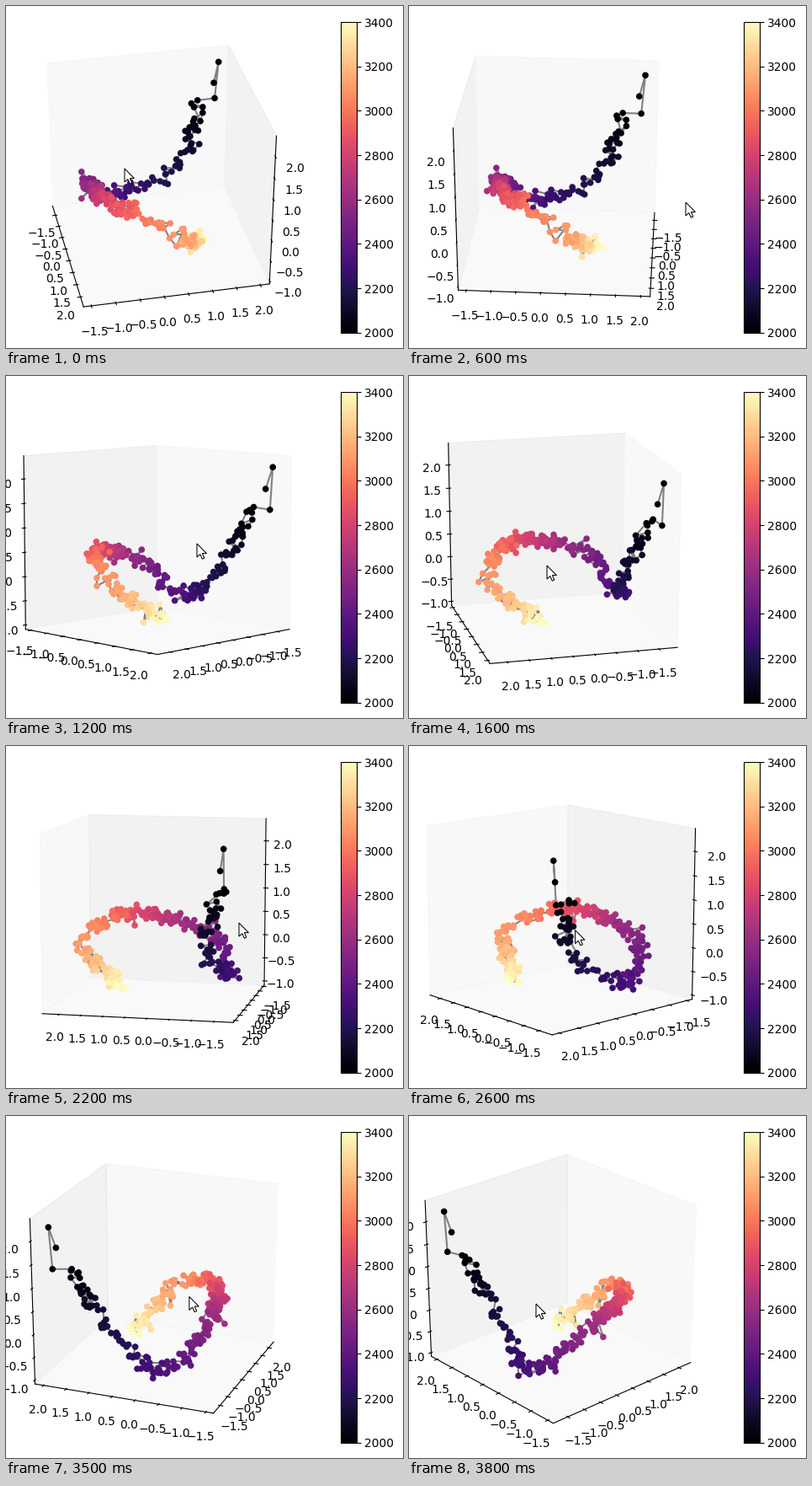
Animation, 472 px wide and 406 px high, one loop 3.9 s. Source, as a matplotlib script:

```python
import numpy as np
import matplotlib.pyplot as plt
from matplotlib.animation import FuncAnimation
from matplotlib.patches import Polygon
from mpl_toolkits.mplot3d import Axes3D

W, H, DPI = 472, 406, 100
FRAMES, STEP = 39, 100


class StretchedAxes3D(Axes3D):
    """3D axes that fill their rectangle instead of staying square."""

    def apply_aspect(self, position=None):
        pass


def rect(left, top, width, height):
    """Pixel box measured from the top left, as figure fractions."""
    return [left / W, 1 - (top + height) / H, width / W, height / H]


# Axis ranges of the box, and its side in view units
LOW = np.array([-1.93, -1.66, -1.09])
HIGH = np.array([2.39, 2.19, 2.47])
SIDE = 25 / 24

# Trail: value, then position relative to the middle of the box
TRAIL = np.array([
    (2000, -.427, .417, .323),
    (2005, -.450, .448, .453),
    (2010, -.450, .430, .198),
    (2015, -.432, .325, .207),
    (2035, -.376, .314, .145),
    (2080, -.350, .275, .025),
    (2130, -.305, .240, -.075),
    (2185, -.307, .134, -.220),
    (2240, -.375, -.012, -.335),
    (2310, -.380, -.130, -.395),
    (2370, -.360, -.220, -.365),
    (2440, -.322, -.315, -.250),
    (2530, -.230, -.350, -.170),
    (2600, -.099, -.362, -.110),
    (2700, .010, -.355, -.090),
    (2780, .099, -.330, -.075),
    (2900, .252, -.243, -.045),
    (3000, .318, -.162, -.070),
    (3060, .360, -.060, -.120),
    (3110, .425, .066, -.190),
    (3200, .331, .112, -.275),
    (3300, .240, .160, -.355),
    (3400, .160, .205, -.425),
])


def make_trail():
    rng = np.random.default_rng(5)
    value = np.arange(2000, 3401, 5)
    pos = np.array([np.interp(value, TRAIL[:, 0], TRAIL[:, i])
                    for i in (1, 2, 3)]).T
    pos[4:] += rng.normal(0, .024, pos[4:].shape)
    data = (LOW + HIGH) / 2 + pos / SIDE * (HIGH - LOW)
    return value, data.T


# Drag keys: time, azimuth, elevation, pointer x, pointer y
KEYS = np.array([
    (0, -12, 34, 141, 193),
    (300, -12, 34, 364, 249),
    (600, 4, 26.5, 329, 233),
    (1200, 45, 8, 227, 199),
    (1600, 75.5, 17, 164, 225),
    (1800, 75.5, 17, 336, 226),
    (2200, 102.3, 9.5, 277, 210),
    (2900, 165.5, 17, 138, 225),
    (3100, 165.5, 17, 307, 203),
    (3800, 228, 27, 151, 223),
])

ARROW = np.array([(0, 0), (0, 16), (3.8, 12.6), (6.3, 18.2), (8.8, 17.1),
                  (6.4, 11.6), (11.4, 11.6)])

# The small surplus keeps the pixel size from rounding down
fig = plt.figure(figsize=((W + .001) / DPI, (H + .001) / DPI), dpi=DPI,
                 facecolor="white")

ax = fig.add_axes(rect(-23.6, 18.7, 396.8, 369.4),
                  axes_class=StretchedAxes3D)
ax.set_box_aspect((1, 1, 1), zoom=np.sqrt(3) / 1.8294640721620434)
ax.grid(False)
ax.zaxis.set_pane_color((.96, .96, .96, .5))

value, (xs, ys, zs) = make_trail()
ax.plot(xs, ys, zs, color="gray", lw=1.5)
dots = ax.scatter(xs, ys, zs, c=value, cmap="magma", vmin=2000, vmax=3400,
                  s=20, depthshade=False)

ax.set_xticks(np.arange(-1.5, 2.1, .5))
ax.set_yticks(np.arange(-1.5, 2.1, .5))
ax.set_zticks(np.arange(-1, 2.1, .5))
for set_lim, lo, hi in zip((ax.set_xlim, ax.set_ylim, ax.set_zlim), LOW, HIGH):
    set_lim(lo, hi, view_margin=0)

bar_ax = fig.add_axes(rect(398.2, 19, 18.5, 368.8))
fig.colorbar(dots, cax=bar_ax, ticks=np.arange(2000, 3401, 200))

# Pointer layer in pixel units
top = fig.add_axes([0, 0, 1, 1], zorder=10)
top.set_xlim(0, W)
top.set_ylim(H, 0)
top.axis("off")
pointer = top.add_patch(Polygon(ARROW, closed=True, facecolor="white",
                                edgecolor="black", lw=.75))


def update(i):
    azim, elev, px, py = [np.interp(i * STEP, KEYS[:, 0], KEYS[:, k])
                          for k in (1, 2, 3, 4)]
    ax.view_init(elev=elev, azim=azim)
    pointer.set_xy(ARROW + (px, py))
    return ax, pointer


anim = FuncAnimation(fig, update, frames=FRAMES, interval=STEP,
                     repeat=True, blit=False)
plt.show()
```
